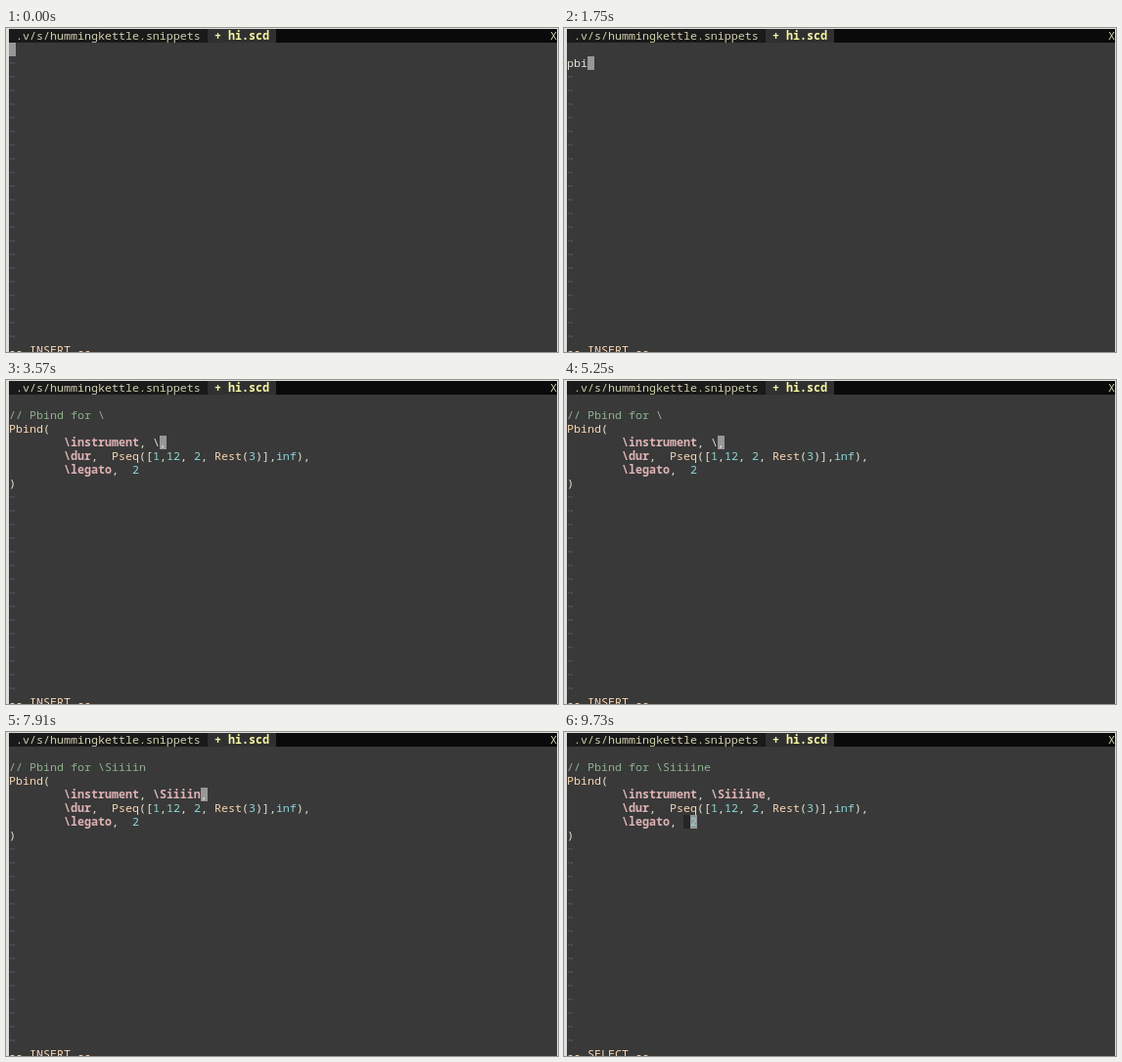
These frames come from a looping animation (564x332 px, 9940 ms). An HTML page:

```html
<!DOCTYPE html>
<html lang="en">
<head>
<meta charset="utf-8">
<title>Snippet expansion in a terminal editor</title>
<style>
  html, body { margin: 0; width: 100%; height: 100%; overflow: hidden; background: #dedede; }
  #term {
    position: absolute; left: 3px; top: 1px; width: 560px; height: 331px;
    overflow: hidden; background: #393939; color: #e4e4d6;
    font: 500 11.6667px/14px "Noto Sans Mono", "DejaVu Sans Mono", monospace;
    font-variant-ligatures: none;
  }
  .row, .block { position: absolute; height: 14px; white-space: pre; }
  .tabs { left: 0; top: 0; width: 560px; background: #0a0a0a; color: #d0d0b0; }
  .tabs span { position: absolute; top: 0; height: 14px; }
  .tab { left: 0; background: #1a1a1a; }
  .active { left: 203px; background: #303030; color: #f8f8a8; font-weight: 700; }
  .close { left: 553px; }
  .tilde { color: #5c6468; }
  .comment { color: #8fb28f; }
  .symbol { color: #dfb3b5; font-weight: 700; }
  .class, .mode { color: #fbd8b4; }
  .number { color: #8cd8da; }
  #select { background: #262626; }
  #cursor { background: #979797; }
</style>
</head>
<body>
<div id="term">
  <div id="select" class="block"></div>
  <div id="cursor" class="block"></div>
  <div id="text"></div>
  <div class="row tabs"><span class="tab"> .v/s/hummingkettle.snippets </span><span class="active"> + hi.scd </span><span class="close">X</span></div>
</div>
<script>
const LOOP = 9940, CELL = 7, LINE = 14, LAST_ROW = 23, BLINK = 525;
const $ = id => document.getElementById(id);

const typed = n => ({ lines: ['', 'pbind'.slice(0, n)], cursor: [2, n] });

const snippet = (name, extra) => ({
  lines: [
    '',
    '// Pbind for ' + name,
    'Pbind(',
    '        \\instrument, ' + name + ',',
    '        \\dur,  Pseq([1,12, 2, Rest(3)],inf),',
    '        \\legato,  2',
    ')'
  ],
  cursor: [4, 21 + name.length],
  ...extra
});

// A selection runs from a column up to the cursor.
const steps = [
  [0, { lines: [''], cursor: [1, 0] }],
  [420, typed(0)],
  [1610, typed(1)],
  [1680, typed(2)],
  [1750, typed(3)],
  [1890, typed(4)],
  [1960, typed(5)],
  [2240, snippet(' \\CoolSineSynth', { from: 21, cursor: [4, 35] })],
  [3150, snippet('\\', { blink: true })],
  [7000, snippet('\\S')],
  [7140, snippet('\\Si')],
  [7280, snippet('\\Sii')],
  [7420, snippet('\\Siii')],
  [7560, snippet('\\Siiii')],
  [7770, snippet('\\Siiiin')],
  [7980, snippet('\\Siiiine')],
  [8330, snippet('\\Siiiine', { from: 14, cursor: [5, 42] })],
  [8960, snippet('\\Siiiine', { from: 17, cursor: [6, 18] })]
];

const syntax = /(?<comment>\/\/.*)|(?<symbol>\\\w+)|(?<class>\b(?:Pbind|Pseq|Rest)\b)|(?<number>\d+|\binf\b)/g;

function highlight(line) {
  return line.replace(syntax, (match, ...args) => {
    const groups = args[args.length - 1];
    const kind = Object.keys(groups).find(key => groups[key]);
    return `<span class="${kind}">${match}</span>`;
  });
}

const rowHtml = (row, html, kind = '') =>
  `<div class="row ${kind}" style="top:${row * LINE}px">${html}</div>`;

function place(el, row, col, width) {
  el.style.top = row * LINE + 'px';
  el.style.left = col * CELL + 'px';
  el.style.width = width * CELL + 'px';
}

function show({ lines, cursor: [row, col], from = col }) {
  let html = '';
  for (let r = 1; r < LAST_ROW; r++) {
    html += r <= lines.length ? rowHtml(r, highlight(lines[r - 1])) : rowHtml(r, '~', 'tilde');
  }
  html += rowHtml(LAST_ROW, from < col ? '-- SELECT --' : '-- INSERT --', 'mode');
  $('text').innerHTML = html;
  place($('select'), row, from, col - from);
  place($('cursor'), row, col, 1);
}

const start = performance.now();
let current;

function frame() {
  const t = (performance.now() - start) % LOOP;
  const step = steps.filter(([at]) => at <= t).pop();
  if (step !== current) {
    current = step;
    show(step[1]);
  }
  const hidden = step[1].blink && Math.floor((t - step[0]) / BLINK) % 2 === 1;
  $('cursor').style.visibility = hidden ? 'hidden' : 'visible';
  requestAnimationFrame(frame);
}
frame();
</script>
</body>
</html>
```
